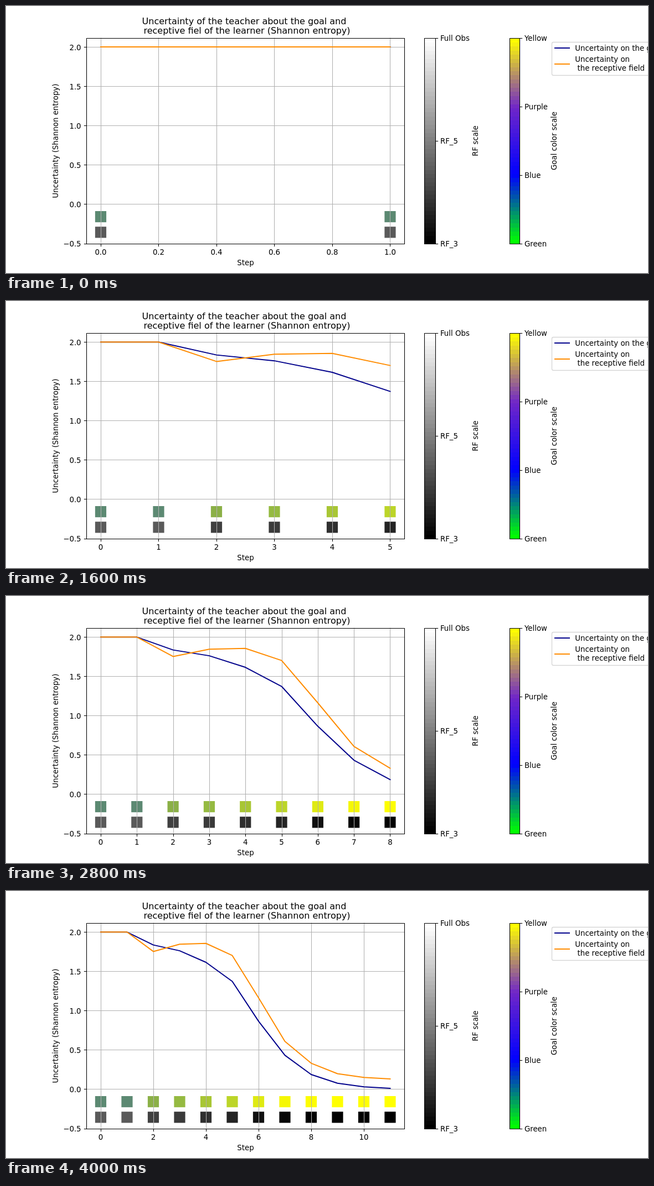
An HTML page with a canvas that plays this animation: 1159 px wide and 483 px high, repeating every 4400 ms.

```html
<!DOCTYPE html>
<html lang="en">
<head>
<meta charset="utf-8">
<title>Uncertainty over steps</title>
<style>
  html, body { margin: 0; width: 100%; height: 100%; overflow: hidden; background: #fff; }
  canvas { display: block; }
</style>
</head>
<body>
<canvas id="stage" width="1159" height="483"></canvas>
<script>
const ctx = document.getElementById('stage').getContext('2d');
const W = 1159, H = 483, HOLD = 400, FRAMES = 11;
const BOX = { l: 144.85, r: 719.6, t: 57.55, b: 429.52 };
const UNIT = 142.08, THIN = 1.07, THICK = 2, TICK = 4.67, MARK = 20.2;

const goal = [2, 2, 1.836, 1.762, 1.615, 1.372, 0.865, 0.432, 0.186, 0.075, 0.03, 0.01];
const field = [2, 2, 1.753, 1.846, 1.856, 1.702, 1.163, 0.608, 0.33, 0.197, 0.15, 0.13];
const goalTint = ['#5c8972', '#5c8972', '#8bb047', '#95ba41', '#a8c634', '#bcd529',
  '#dfea13', '#f5f705', '#fdfd01', '#ffff00', '#ffff00', '#ffff00'];
const fieldGrey = [90, 90, 64, 58, 47, 36, 17, 6, 2, 0, 0, 0];
const scale = [[0, 255, 0], [0, 0, 255], [112, 38, 200], [255, 255, 0]];

const snap = v => Math.round(v) + 0.5;
const yOf = v => BOX.b - (v + 0.5) * UNIT;
const grey = v => `rgb(${v},${v},${v})`;

function line(x1, y1, x2, y2, color, width = THIN) {
  ctx.strokeStyle = color;
  ctx.lineWidth = width;
  ctx.beginPath();
  ctx.moveTo(x1, y1);
  ctx.lineTo(x2, y2);
  ctx.stroke();
}

function frame(l, t, r, b) {
  ctx.strokeStyle = '#000';
  ctx.lineWidth = THIN;
  ctx.strokeRect(l, t, r - l, b - t);
}

function text(str, x, y, align = 'left', size = 13.33) {
  ctx.font = `${size}px "DejaVu Sans", sans-serif`;
  ctx.textAlign = align;
  ctx.fillStyle = '#000';
  ctx.fillText(str, x, y);
}

function upright(str, x, y) {
  ctx.save();
  ctx.translate(x, y);
  ctx.rotate(-Math.PI / 2);
  text(str, 0, 0, 'center');
  ctx.restore();
}

function curve(data, n, xOf, color) {
  // A level line sits on whole pixels.
  const level = data.slice(0, n + 1).every(v => v === data[0]);
  ctx.strokeStyle = color;
  ctx.lineWidth = THICK;
  ctx.lineCap = 'square';
  ctx.lineJoin = 'round';
  ctx.beginPath();
  for (let i = 0; i <= n; i++) {
    const y = yOf(data[i]);
    ctx.lineTo(xOf(i), level ? Math.round(y) : y);
  }
  ctx.stroke();
  ctx.lineCap = 'butt';
}

function scaleColor(u) {
  const p = u * 3, i = Math.min(2, Math.floor(p)), f = p - i;
  return `rgb(${scale[i].map((c, k) => Math.round(c + (scale[i + 1][k] - c) * f))})`;
}

function colorBar(l, r, color, labels) {
  const bands = 50, top = 58.5, bottom = 430.5;
  const edge = i => Math.round(bottom - (bottom - top) * i / bands);
  for (let i = 0; i < bands; i++) {
    ctx.fillStyle = color(i / (bands - 1));
    ctx.fillRect(l, edge(i + 1), r - l, edge(i) - edge(i + 1));
  }
  frame(l, top, r, bottom);
  labels.forEach((label, i) => {
    const y = BOX.b - (BOX.b - BOX.t) * i / (labels.length - 1);
    line(r, snap(y), r + TICK, snap(y), '#000');
    text(label, r + 8.4, Math.round(y + 5.5));
  });
}

function legend() {
  ctx.strokeStyle = 'rgba(204,204,204,.8)';
  ctx.lineWidth = 1.33;
  ctx.beginPath();
  ctx.roundRect(985.5, 65.5, 220, 60, 2.7);
  ctx.stroke();
  line(990, 76, 1018, 76, '#00008b', THICK);
  line(990, 105, 1018, 105, '#ff8c00', THICK);
  text('Uncertainty on the goal', 1027.3, 81);
  text('Uncertainty on', 1027.3, 101);
  text('the receptive field', 1031.5, 117);
}

function stepSize(n) {
  return [0.2, 0.25, 0.5, 1, 2].find(s => s >= n * 1.1 / 9);
}

function plot(n) {
  const left = BOX.l, width = BOX.r - left;
  const xOf = v => left + width * (1 / 22 + v / n * 10 / 11);
  for (let i = 0; i <= n; i++) {
    const x = xOf(i) - MARK / 2;
    ctx.fillStyle = goalTint[i];
    ctx.fillRect(x, 371, MARK, MARK);
    ctx.fillStyle = grey(fieldGrey[i]);
    ctx.fillRect(x, 399.2, MARK, MARK);
  }

  const step = stepSize(n), digits = step === 0.25 ? 2 : step < 1 ? 1 : 0;
  for (let i = 0; i * step <= n + 1e-6; i++) {
    const x = xOf(i * step);
    line(snap(x), BOX.t, snap(x), BOX.b, '#b0b0b0');
    line(snap(x), 430.5, snap(x), 430.5 + TICK, '#000');
    text((i * step).toFixed(digits), x, 450, 'center');
  }
  for (let v = -0.5; v <= 2; v += 0.5) {
    const y = yOf(v);
    line(left, snap(y), BOX.r, snap(y), '#b0b0b0');
    line(145.5 - TICK, snap(y), 145.5, snap(y), '#000');
    text(v.toFixed(1).replace('-', '\u2212'), 135.6, Math.round(y + 5.5), 'right');
  }
  curve(goal, n, xOf, '#00008b');
  curve(field, n, xOf, '#ff8c00');
  frame(145.5, 58.5, 719.5, 430.5);
}

function draw(n) {
  ctx.fillStyle = '#fff';
  ctx.fillRect(0, 0, W, H);
  plot(n);
  text('Uncertainty of the teacher about the goal and', 430, 33, 'center', 16);
  text('receptive fiel of the learner (Shannon entropy)', 435, 50, 'center', 16);
  text('Step', 432.5, 469, 'center');
  upright('Uncertainty (Shannon entropy)', 94, 244);
  colorBar(755.5, 775.5, u => grey(Math.round(u * 255)), ['RF_3', 'RF_5', 'Full Obs']);
  upright('RF scale', 852, 244);
  colorBar(909.5, 927.5, scaleColor, ['Green', 'Blue', 'Purple', 'Yellow']);
  upright('Goal color scale', 994, 244);
  legend();
}

const start = performance.now();
let shown = 0;
function tick() {
  const t = Math.max(0, performance.now() - start);
  const n = Math.floor(t / HOLD) % FRAMES + 1;
  if (n !== shown) draw(shown = n);
  requestAnimationFrame(tick);
}
tick();
</script>
</body>
</html>
```
